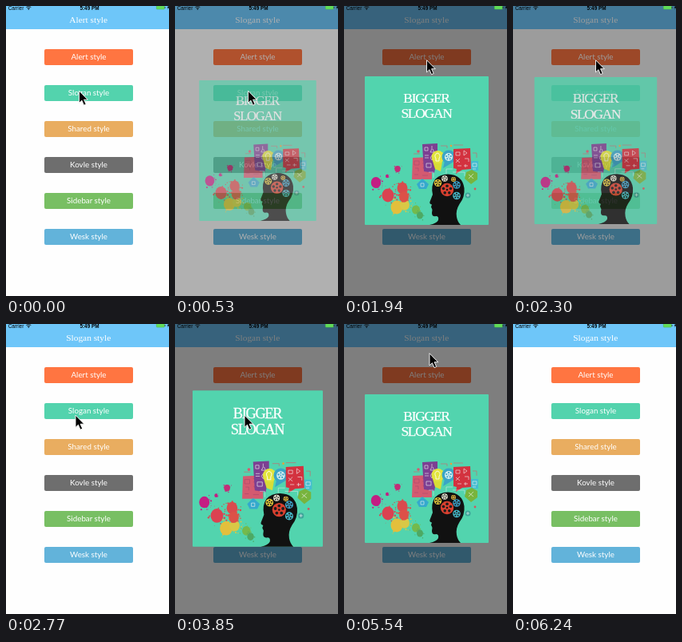
Animation of 204x363 px, one loop 7280 ms. Source, as an HTML page:

```html
<!DOCTYPE html>
<html lang="en">
<head>
<meta charset="utf-8">
<title>Popup styles</title>
<style>
  html, body { margin: 0; width: 100%; height: 100%; overflow: hidden; background: #fefefe; }
  svg { display: block; width: 100vw; height: 100vh; }
  text { text-anchor: middle; }
  .label { font: 9.8px Lato, "Open Sans", sans-serif; fill: #fff; }
  .title { font: 11.4px "Liberation Serif", serif; fill: #fff; }
  .status { font: 6.4px "Liberation Sans", sans-serif; }
  .slogan { font: 17.5px "Liberation Serif", serif; letter-spacing: -1.3px; fill: #fff; stroke: #fff; stroke-width: .25; }
</style>
</head>
<body>
<svg viewBox="0 0 204 363">
  <rect width="204" height="363" fill="#fefefe"/>
  <rect width="204" height="29" fill="#6ec6f9"/>
  <text id="title" class="title" x="103.2" y="21"></text>
  <g id="buttons"></g>
  <rect id="dim" width="204" height="363"/>
  <g id="popup">
    <rect x="26" y="88" width="155" height="186" rx="1" fill="#52d4ae"/>
    <text class="slogan" x="103" y="120.8">BIGGER</text>
    <text class="slogan" x="103" y="140.5">SLOGAN</text>
    <g id="splats"></g>
    <g id="ideas"></g>
    <path fill="#111" d="M107 274Q116 272 118 268Q119 263 115 263Q110 264 110 259L110.500 255L109 251.500L110 248.500Q106.500 247.500 107.500 245L111 236Q108.500 225 114 217Q120 210.500 130 210.500Q148 211 150.500 228Q151.500 239 144.500 248Q139.500 256 141 264Q142 270 146 274Z"/>
    <g id="gears"></g>
  </g>
  <g id="statusbar">
    <text class="status" x="12.5" y="4.8">Carrier</text>
    <path d="M25.300 1.500Q28.300 -1 31.300 1.500M26.600 2.900Q28.300 1.400 30 2.900" fill="none" stroke="#111" stroke-width=".9"/>
    <circle cx="28.3" cy="4" r=".8"/>
    <text class="status" x="104.5" y="4.8" style="font-weight:700">5:49 PM</text>
    <rect x="188.3" y="-.5" width="10" height="4.6" rx=".8" fill="#62dc58" stroke="#48b94b" stroke-width=".5"/>
    <path d="M199 1v2" stroke="#222" stroke-width=".7"/>
    <path d="M203.500 -.5L201.500 2.300H203L202.300 4.500L204 2Z"/>
  </g>
  <path id="cursor" d="M.5 .7V15.900L3.900 12.700L6.500 18.700L9.200 17.500L6.600 11.700H11.300Z" stroke="#fff" stroke-width=".9" stroke-linejoin="round"/>
</svg>
<script>
const LOOP = 7280;
const $ = id => document.getElementById(id);
const clamp = v => Math.min(1, Math.max(0, v));
const smooth = v => v * v * (3 - 2 * v);

const circle = (x, y, r, fill) => `<circle cx="${x}" cy="${y}" r="${r}" fill="${fill}"/>`;
const shape = (d, fill) => `<path d="${d}" fill="${fill}"/>`;
const line = (d, color = '#f4f4f4', width = .6) =>
  `<path d="${d}" fill="none" stroke="${color}" stroke-width="${width}"/>`;

// A disc with a ring of round holes and a hub
function gear(x, y, r, color, holes = '#1c1c1c') {
  let out = circle(x, y, r, color);
  for (let i = 0; i < 5; i++) {
    const a = i * Math.PI * .4;
    out += circle(x + r * .58 * Math.sin(a), y - r * .58 * Math.cos(a), r * .22, holes);
  }
  return out + circle(x, y, r * .16, holes);
}

function randomizer(seed) {
  return () => (seed = (seed * 16807) % 2147483647) / 2147483647;
}

function drawButtons() {
  const items = [
    ['Alert', '#ff7541'], ['Slogan', '#53d3ad'], ['Shared', '#e9ad60'],
    ['Kovle', '#6e6e6e'], ['Sidebar', '#78bf63'], ['Wesk', '#62b3da'],
  ];
  $('buttons').innerHTML = items.map(([name, color], i) => {
    const y = 54 + 45 * i;
    return `<rect x="48" y="${y}" width="111" height="20" rx="2" fill="${color}"/>
      <text class="label" x="103.5" y="${y + 13}">${name} style</text>`;
  }).join('');
}

function drawSplats() {
  const random = randomizer(41);
  const blobs = [
    [66, 252, 7.5, '#e3bf3c'], [76, 249, 6, '#d9c846'], [90, 255, 5, '#74ba4c'], [95, 262, 4, '#4da963'],
    [40, 221, 6.2, '#c41d83'], [67, 204, 3.6, '#c32c78'], [54, 213, 2, '#c41d83'],
    [55, 237, 7.5, '#db4251'], [73, 228, 6.5, '#d94b4d'], [75, 239, 6, '#dc5148'],
  ];
  $('splats').innerHTML = blobs.map(([x, y, r, color]) => {
    let out = `<ellipse cx="${x}" cy="${y}" rx="${r}" ry="${r * 1.12}" fill="${color}"/>`;
    for (let i = 0; i < r * 2; i++) {
      const angle = random() * 6.283, reach = r * (.95 + random() * .75);
      out += circle(x + reach * Math.cos(angle), y + reach * Math.sin(angle), .3 + random() * r * .13, color);
    }
    return out;
  }).join('');
}

function drawIdeas() {
  $('ideas').innerHTML =
    shape('M86 190L110 189V217H85Z', '#d45a70') +
    line('M88 194h6v5h-6z M98 193h8 M98 197h8 M89 203h4v4 M99 202l3 5l3 -5z M88 211h5 M98 212h7', '#a8486c') +
    shape('M98 173L117 172V190L113 209L100 207Z', '#7c3f92') +
    line('M101 177h4v4h-4z M110 175v4l-2 4h5l-2 -4 M101 187h5 M101 190h5 M110 187l3 3l-3 3l-2 -3z M103 197h6v5h-6z') +
    shape('M110 191L123 195L121 207L114 204Z', '#d8dd36') + circle(117.5, 189, 8, '#e2e43d') +
    line('M115 191Q112 186 117 184Q122 186 119 191V194H115Z', '#fafae0', 1) +
    shape('M126 194L124 203L134 197Z', '#3aa5c6') + circle(131, 189, 8.5, '#3aa5c6') +
    gear(131, 189, 5, '#d5ecf0', '#3aa5c6') +
    shape('M137 179L158 178L159 204L148 205L140 210L141 204L137 203Z', '#d3323f') +
    line('M140 183h5v4h-5z M150 181l4 3l-4 3z M140 192l5 4 M145 191l-5 5 M151 191h5v4 M142 200h5 M152 198v4 M150 200h5') +
    line('M136 208H151V213 M128 210V204H136 M112 215V208H106', '#e6eee9', .5) +
    shape('M159 194H168V206H162L159 209Z', '#43bdd0') + line('M161 197h5v4h-5z M161 204h4') +
    shape('M153 208L160 205L167 209V217L159 223L151 216Z', '#78b43d') +
    line('M156 211l6 5 M162 210l-6 6') +
    shape('M91 223L98 216L106 223L103 229H94Z', '#35a9cd') + line('M96 222h4v4h-4z') +
    circle(155, 237, 3.5, '#3ea59a') + line('M153 237h4 M155 235v4') +
    circle(93, 182, 1.8, '#d45a70') + circle(164, 229, 1.4, '#cf5960') + circle(134, 175, 1.3, '#e5a13b') +
    line('M121 175h8v3 M137 174h12 M161 184h5v6 M87 185h8', '#d06068');
}

function drawGears() {
  $('gears').innerHTML = [
    [117.5, 221.5, 4.6, '#e4c83b'], [126, 216, 3.8, '#ece9d7'], [137, 217, 3, '#e6b93d'],
    [141, 224, 4.8, '#3c9ec4'], [129, 230, 8.2, '#d9402f'], [141, 237.5, 4.8, '#45b8c9'],
  ].map(g => gear(...g)).join('');
}

// Underdamped spring: overshoots after 235 ms, then settles on 1
function spring(ms) {
  const w = Math.PI / 235, k = 1.35 / 235;
  return 1 - .2 * Math.exp(-k * ms) * (Math.cos(w * ms) + k / w * Math.sin(w * ms));
}

// Each entry: time, x, y of the pointer tip
const pointerPath = [
  [0, 91, 105.5], [1110, 91, 105.5], [1410, 103, 68], [1900, 103, 68], [1940, 103, 67],
  [2400, 103, 67], [2770, 86.5, 113.5], [3900, 86.5, 113.5], [4310, 102, 164],
  [4520, 114, 169], [4950, 110.5, 116], [5330, 110.5, 116], [5540, 106.5, 36],
];

function pointerAt(t) {
  const next = pointerPath.findIndex(p => p[0] > t);
  if (next < 0) return pointerPath.at(-1).slice(1);
  const [t0, x0, y0] = pointerPath[next - 1], [t1, x1, y1] = pointerPath[next];
  const f = smooth((t - t0) / (t1 - t0));
  return [x0 + (x1 - x0) * f, y0 + (y1 - y0) * f];
}

function render(t) {
  const [open, close] = t < 3000 ? [420, 2240] : [3610, 5960];
  const leaving = clamp((t - close) / 270);
  const alpha = clamp((t - open) / 180) * (1 - leaving);
  const scale = spring(Math.max(0, t - open)) * (1 - .2 * leaving * leaving);

  $('title').textContent = (t < 420 ? 'Alert' : 'Slogan') + ' style';
  $('dim').setAttribute('opacity', .5 * alpha);
  $('popup').setAttribute('opacity', alpha);
  $('popup').setAttribute('transform', `translate(103.5 181) scale(${scale}) translate(-103.5 -181)`);
  $('cursor').setAttribute('transform', `translate(${pointerAt(t)})`);
  $('cursor').setAttribute('visibility', t < 6200 ? 'visible' : 'hidden');
}

function tick() {
  render(performance.now() % LOOP);
  requestAnimationFrame(tick);
}

drawButtons();
drawSplats();
drawIdeas();
drawGears();
tick();
</script>
</body>
</html>
```
